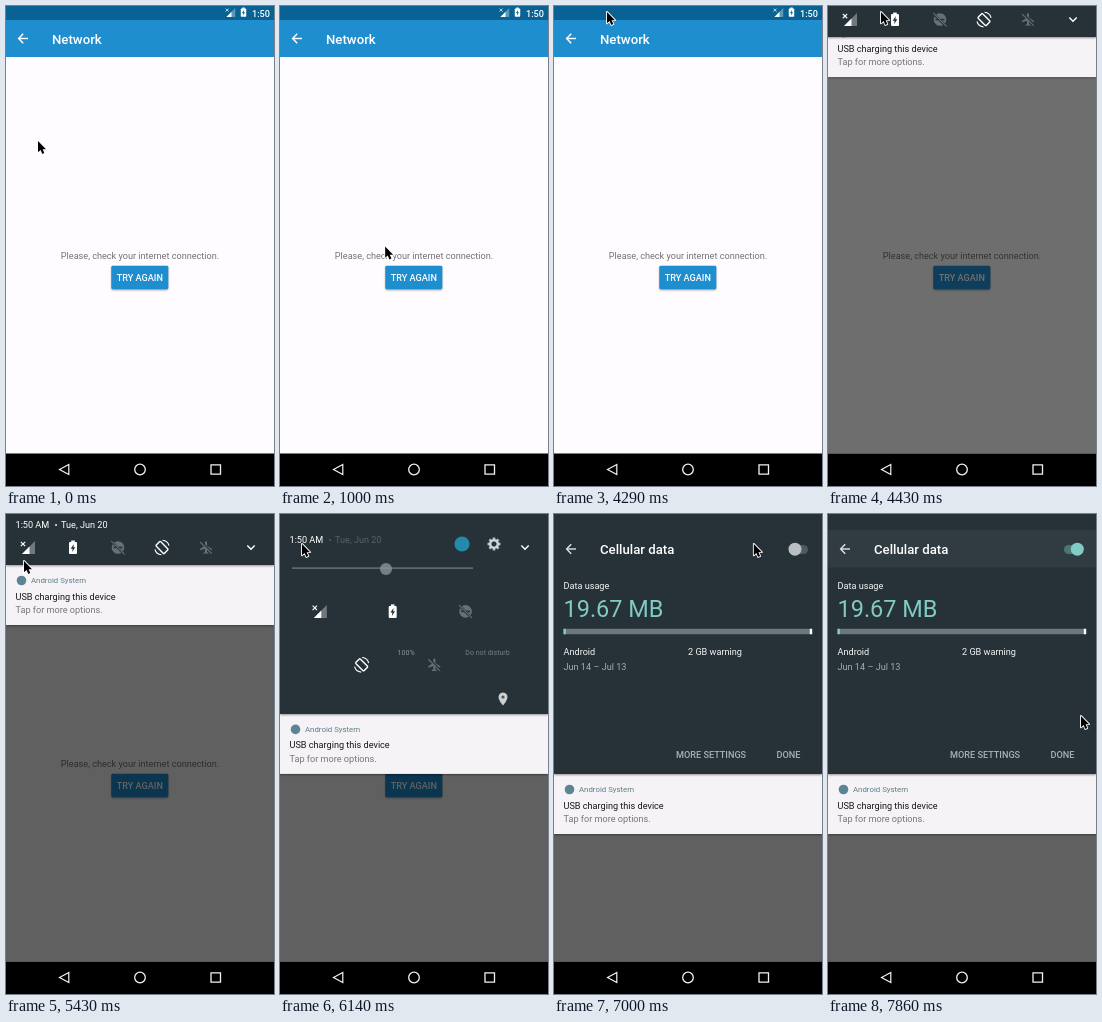
An HTML page with a canvas for the animation above (8 s loop, 268x480 px).

```html
<!DOCTYPE html>
<html lang="en">
<head>
<meta charset="utf-8">
<title>Network settings</title>
<style>
html, body { margin: 0; width: 100%; height: 100%; overflow: hidden; background: #fefcfe; }
canvas { display: block; width: 268px; height: 480px; }
</style>
</head>
<body>
<canvas id="stage"></canvas>
<script>
const W = 268, H = 480, LOOP = 8000, FPS = 7;
const PANEL = '#263238', TEAL = '#80cbc4', DIM = '#647176';
const canvas = document.getElementById('stage');
const g = canvas.getContext('2d');
const dpr = window.devicePixelRatio || 1;
canvas.width = W * dpr;
canvas.height = H * dpr;

const clamp = v => Math.min(1, Math.max(0, v));
const mix = (a, b, p) => a + (b - a) * p;
const span = (t, from, to) => clamp((t - from) / (to - from));
const easeInOut = p => p * p * (3 - 2 * p);
const easeOut = (p, n) => 1 - Math.pow(1 - p, n);

// time, x, y of the pointer tip
const PATH = [
  [0, 32, 135], [100, 32, 135], [1290, 118, 259], [1430, 118, 259],
  [1710, 127, 271], [1860, 127, 271], [2285, 128, 273], [2430, 128, 273],
  [4200, 53, 6], [4430, 53, 6], [5350, 18, 47], [5600, 18, 47],
  [6000, 22, 30], [6300, 22, 30], [7285, 245, 30], [7440, 245, 30],
  [7850, 253, 202], [LOOP, 253, 202]
];

function pointerAt(t) {
  let i = 1;
  while (i < PATH.length - 1 && PATH[i][0] < t) i++;
  const [t0, x0, y0] = PATH[i - 1], [t1, x1, y1] = PATH[i];
  const p = easeInOut(span(t, t0, t1));
  return [mix(x0, x1, p), mix(y0, y1, p)];
}

function rect(x, y, w, h, color) {
  g.fillStyle = color;
  g.fillRect(x, y, w, h);
}

function text(str, x, y, size, color, weight = 400, align = 'left') {
  g.font = `${weight} ${size}px Roboto, sans-serif`;
  g.textAlign = align;
  g.fillStyle = color;
  g.fillText(str, x, y);
}

function trace(pts, close) {
  g.beginPath();
  for (let i = 0; i < pts.length; i += 2) g.lineTo(pts[i], pts[i + 1]);
  if (close) g.closePath();
}

function poly(pts, color) {
  trace(pts, true);
  g.fillStyle = color;
  g.fill();
}

function line(pts, color, width, close) {
  trace(pts, close);
  g.strokeStyle = color;
  g.lineWidth = width;
  g.stroke();
}

function disc(x, y, r, color) {
  g.beginPath();
  g.arc(x, y, r, 0, 7);
  g.fillStyle = color;
  g.fill();
}

function ring(x, y, r, color, width) {
  g.beginPath();
  g.arc(x, y, r, 0, 7);
  g.strokeStyle = color;
  g.lineWidth = width;
  g.stroke();
}

function box(x, y, w, h, r, color) {
  g.beginPath();
  g.roundRect(x, y, w, h, r);
  g.fillStyle = color;
  g.fill();
}

// runs draw with the origin at x, y
function at(x, y, draw, scale = 1) {
  g.save();
  g.translate(x, y);
  g.scale(scale, scale);
  draw();
  g.restore();
}

function faded(alpha, draw) {
  g.save();
  g.globalAlpha *= alpha;
  draw();
  g.restore();
}

function shadow(color, blur, dy) {
  g.shadowColor = color;
  g.shadowBlur = blur * dpr;
  g.shadowOffsetY = dy * dpr;
}

function signal() {
  poly([7, -6.5, 7, 6.5, -6, 6.5], 'rgba(255,255,255,.35)');
  poly([1.5, -1, 1.5, 6.5, -6, 6.5], '#fff');
  line([-7.2, -5.7, -2.8, -1.3], '#fff', 1.1);
  line([-2.8, -5.7, -7.2, -1.3], '#fff', 1.1);
}

function battery(bolt) {
  box(-4, -5.5, 8, 12, 1, '#fff');
  rect(-1.8, -7, 3.6, 2, '#fff');
  poly([.8, -3.5, -2.3, 1.2, -.4, 1.2, -.8, 4.6, 2.3, -.2, .4, -.2], bolt);
}

function noDisturb() {
  disc(0, 0, 6.3, DIM);
  line([-4.5, 0, 4.5, 0], PANEL, 1.5);
  line([-6.5, -6, 6.5, 7], PANEL, 2.4);
  line([-6.8, -6.6, 6.6, 6.8], DIM, 1.1);
}

function rotate() {
  g.save();
  g.rotate(-Math.PI / 4);
  g.beginPath();
  g.roundRect(-3.2, -5.8, 6.4, 11.6, 1);
  g.strokeStyle = '#fff';
  g.lineWidth = 1.4;
  g.stroke();
  g.restore();
  for (const a of [-1.5, 1.64]) {
    g.beginPath();
    g.arc(0, 0, 7.3, a, a + 1.25);
    g.lineWidth = 1.1;
    g.stroke();
  }
}

function airplane() {
  poly([0, -6.5, 1, -5.5, 1, -1.8, 6, 1.4, 6, 2.8, 1, 1.2, 1, 4.4, 2.4, 5.5, 2.4, 6.5,
    0, 5.8, -2.4, 6.5, -2.4, 5.5, -1, 4.4, -1, 1.2, -6, 2.8, -6, 1.4, -1, -1.8, -1, -5.5], DIM);
  line([-5.2, -6, 6, 5.2], PANEL, 2);
  line([-6, -5.6, 5.6, 6], DIM, 1.1);
}

function pin() {
  g.beginPath();
  g.arc(0, -2, 4.5, Math.PI * .9, Math.PI * 2.1);
  g.quadraticCurveTo(3.4, 2.6, 0, 6.5);
  g.quadraticCurveTo(-3.4, 2.6, -4.3, -.6);
  g.fillStyle = '#fff';
  g.fill();
  disc(0, -2, 1.6, PANEL);
}

function gear() {
  for (let i = 0; i < 8; i++) {
    const a = i * Math.PI / 4, c = Math.cos(a), s = Math.sin(a);
    line([c * 3, s * 3, c * 6.5, s * 6.5], '#dfe4e6', 2.6);
  }
  ring(0, 0, 3.8, '#dfe4e6', 2.6);
}

function backArrow(x, y, color) {
  line([x + 10, y, x + 1, y], color, 1.4);
  line([x + 5.2, y - 4.8, x + .6, y, x + 5.2, y + 4.8], color, 1.4);
}

function page() {
  rect(0, 0, W, H, '#fefcfe');
  rect(0, 14, W, 37, '#1f8ecf');
  rect(0, 0, W, 14, '#086294');
  at(224.5, 6.5, signal, .68);
  at(237.5, 6.3, () => battery('#086294'), .68);
  text('1:50', 246, 10.5, 9.13, '#fff', 500);
  backArrow(12, 32.5, '#fff');
  text('Network', 46, 37.7, 13.2, '#fff', 500);
  text('Please, check your internet connection.', 134, 253, 9.13, '#747274', 400, 'center');
  g.save();
  shadow('rgba(0,0,0,.35)', 2, 1);
  box(105.3, 259.8, 57, 23.4, 1.4, '#1f8ecf');
  g.restore();
  text('TRY AGAIN', 133.8, 275, 9.13, '#fff', 500, 'center');
}

function navBar() {
  rect(0, 447.5, W, 33, '#000');
  line([53.5, 463.5, 62.8, 458.5, 62.8, 468.5], '#f2f2f2', 1.2, true);
  ring(134, 463.5, 5.3, '#f2f2f2', 1.3);
  line([205, 458.8, 214.5, 458.8, 214.5, 468.2, 205, 468.2], '#f2f2f2', 1.3, true);
}

function card(y) {
  g.save();
  shadow('rgba(0,0,0,.4)', 2, 1);
  rect(0, y, W, 60, '#f6f3f6');
  g.restore();
  disc(15.5, y + 15.5, 4.8, '#5b8494');
  text('Android System', 25, y + 18.3, 7.83, '#607d8b');
  text('USB charging this device', 9.5, y + 34.5, 9.13, '#161616');
  text('Tap for more options.', 9.5, y + 47.8, 9.13, '#777577');
}

function quickSettings(q) {
  const tile = (x0, x1, y1, icon) => at(mix(x0, x1, q), mix(33.5, y1, q), icon);
  const dateY = mix(13.5, 34, q);
  text('1:50 AM', 9.5, dateY, 9.13, '#fff');
  faded(1 - q, () => {
    text('•', 50, dateY, 9.13, '#fff', 400, 'center');
    text('Tue, Jun 20', 55, dateY, 9.13, '#fff');
  });
  tile(22, 45, 116, signal);
  tile(67, 126, 116, () => battery(PANEL));
  tile(112, 207, 116, noDisturb);
  tile(156, 60, 185, rotate);
  tile(200, 141, 185, airplane);
  line([241.3, 31.5, 245, 35.2, 248.7, 31.5], '#fff', 1.4);
  faded(q, () => {
    disc(182, 30, 7.6, '#23a5cf');
    at(214, 30, gear);
    rect(12, 53.5, 181, 1.2, '#8b979c');
    disc(106, 55, 6, '#8b979c');
    text('100%', 126, 141, 7.1, '#a9b2b6', 400, 'center');
    text('Do not disturb', 207.5, 141, 7.1, '#89959a', 400, 'center');
    at(223, 185, pin);
    text('Auto-rotate', 60.5, 208.7, 7.1, '#b4bcbf', 400, 'center');
    text('Airplane mode', 142, 208.7, 7.1, '#98a3a8', 400, 'center');
    text('Location', 223, 208.7, 7.1, '#b4bcbf', 400, 'center');
    text('EDIT', 230, 225.5, 9.13, '#728086', 500);
  });
}

function toggle(on) {
  box(236, 31, 18, 9, 4.5, on > .5 ? '#4a7775' : '#4d5a60');
  disc(mix(241, 249.3, on), 35.2, 6.5, on > .5 ? TEAL : '#b9bfc2');
}

function detail(t) {
  const done = span(t, 6290, 6570);
  rect(0, 0, W, 262, PANEL);
  rect(0, 0, W, 262, `rgba(255,255,255,${.04 * (1 - done)})`);
  const press = span(t, 7440, 7710);
  if (press > 0) rect(0, 16, W, 37.5, `rgba(255,255,255,${.05 * press})`);
  backArrow(12, 35, '#dfe3e5');
  text('Cellular data', 46, 39.8, 13.2, '#fff', 500);
  toggle(easeInOut(span(t, 7440, 7710)));
  text('Data usage', 9.5, 75.2, 9.13, '#f4f6f6');
  text('19.67 MB', 9.5, 103.3, 23.47, TEAL);
  rect(9.5, 114.8, 248.5, 5.4, '#6c787d');
  rect(9.5, 114.8, 2.4, 5.4, TEAL);
  rect(255.8, 114.8, 2.4, 5.4, '#fff');
  text('Android', 9.5, 140.7, 9.13, '#f4f6f6');
  text('2 GB warning', 134, 140.7, 9.13, '#f4f6f6');
  text('Jun 14 – Jul 13', 9.5, 156, 9.13, '#a3acb0');
  text('MORE SETTINGS', 122, 244, 9.13, '#a5b1b6', 500);
  text('DONE', 222.5, 244, 9.13, '#a5b1b6', 500);
}

function shade(t) {
  const open = easeOut(span(t, 4290, 4660), 2);
  if (open <= 0) return;
  const grow = easeOut(span(t, 5930, 6556), 3);
  const lift = -51 * (1 - open);
  const height = mix(51, 260, grow);
  rect(0, 0, W, 447.5, `rgba(0,0,0,${mix(.56, .615, span(open, .6, 1))})`);
  card(height + 2 * lift);
  at(0, lift, () => {
    g.save();
    shadow('rgba(0,0,0,.4)', 2, 1);
    rect(0, 0, W, height, PANEL);
    g.restore();
    g.beginPath();
    g.rect(0, 0, W, height);
    g.clip();
    const reveal = span(t, 6150, 6480);
    if (reveal < 1) quickSettings(clamp(grow / .92));
    if (reveal > 0) {
      g.beginPath();
      g.arc(22, 34, 341 * reveal, 0, 7);
      g.clip();
      faded(mix(.85, 1, reveal * reveal), () => detail(t));
    }
  });
}

function pointer(t) {
  const [x, y] = pointerAt(t);
  at(x, y, () => {
    const pts = [0, 0, 0, 11.3, 2.6, 8.9, 4.3, 13, 6.3, 12.1, 4.6, 8.2, 8, 8.2];
    g.lineJoin = 'round';
    line(pts, '#fff', 1.8, true);
    poly(pts, '#000');
  });
}

function draw(now) {
  const t = Math.floor(((now % LOOP) + 3) * FPS / 1000) * 1000 / FPS % LOOP;
  g.setTransform(dpr, 0, 0, dpr, 0, 0);
  page();
  shade(t);
  navBar();
  pointer(t);
}

const start = performance.now();
function tick() {
  draw(performance.now() - start);
  requestAnimationFrame(tick);
}
tick();
</script>
</body>
</html>
```
